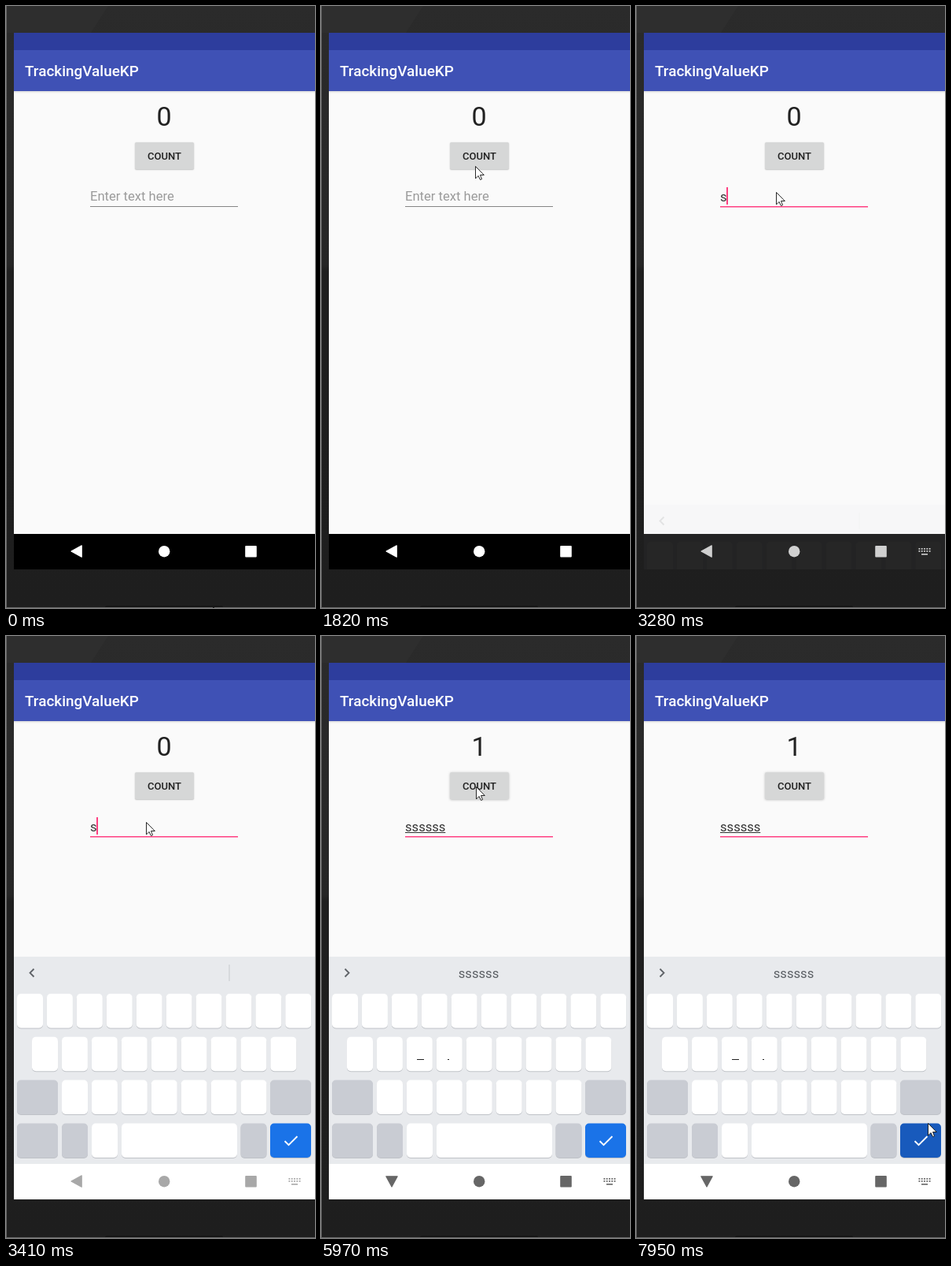
These frames come from a looping animation (393x764 px, 8 s). An HTML page with a canvas:

```html
<!DOCTYPE html>
<html lang="en">
<head>
<meta charset="utf-8">
<title>Counter demo</title>
<style>
html, body { margin: 0; width: 100%; height: 100%; overflow: hidden; background: #1e1e1e; }
canvas { display: block; }
</style>
</head>
<body>
<canvas id="stage" width="393" height="764"></canvas>
<script>
const screenCtx = document.getElementById('stage').getContext('2d');
const layer = Object.assign(document.createElement('canvas'), { width: 393, height: 764 });
const layerCtx = layer.getContext('2d');
let ctx = screenCtx;

const LOOP = 8000;
const TICK = 135;
const PINK = '#ff4081';
const GLYPH = 8.55;
const TIME = {
  focus: 2530, imeIcon: 2980, firstKey: 3280, keyboardUp: 3410, suggest: 3860,
  lastKey: 4340, press: 5520, count: 5660, release: 5970, done: 7800
};

// Each move bends towards (cx, cy) and ends at (x, y) after a number of ticks
const pointerStart = { x: 263, y: 762 };
const moves = [
  { start: 140, ticks: 4, cx: 353, cy: 620, x: 199, y: 359 },
  { start: 840, ticks: 5, cx: 176, cy: 270, x: 212, y: 186 },
  { start: 1820, ticks: 3, cx: 176, cy: 222, x: 178, y: 236 },
  { start: 4880, ticks: 3, cx: 186, cy: 212, x: 197, y: 191 },
  { start: 6560, ticks: 8, cx: 270, cy: 440, x: 371, y: 618 }
];

const clamp = v => Math.min(1, Math.max(0, v));
const smooth = p => p * p * (3 - 2 * p);
const bend = (a, b, c, p) => (1 - p) ** 2 * a + 2 * p * (1 - p) * b + p * p * c;

function pointerAt(t) {
  let pos = pointerStart;
  for (const m of moves) {
    if (t < m.start) break;
    const p = smooth(clamp((Math.floor((t - m.start) / TICK) + 1) / m.ticks));
    pos = { x: Math.round(bend(pos.x, m.cx, m.x, p)), y: Math.round(bend(pos.y, m.cy, m.y, p)) };
  }
  return pos;
}

const typed = t => Math.max(0, Math.min(6, 1 + Math.floor((t - TIME.firstKey) / 200)));
const composed = t => typed(t - 200);
const caretOn = t => t >= TIME.focus && Math.floor(Math.max(0, t - TIME.lastKey) / 500) % 2 === 0;
const navFade = t => t < TIME.firstKey ? 0 : clamp(0.31 + 0.26 * Math.floor((t - TIME.firstKey) / 130));

function rect(x, y, w, h, color) {
  ctx.fillStyle = color;
  ctx.fillRect(x, y, w, h);
}

function round(x, y, w, h, r, color) {
  ctx.fillStyle = color;
  ctx.beginPath();
  ctx.roundRect(x, y, w, h, r);
  ctx.fill();
}

function poly(points, fill, stroke, width = 1) {
  ctx.beginPath();
  points.forEach(([x, y]) => ctx.lineTo(x, y));
  if (fill) {
    ctx.closePath();
    ctx.fillStyle = fill;
    ctx.fill();
  }
  if (stroke) {
    ctx.strokeStyle = stroke;
    ctx.lineWidth = width;
    ctx.stroke();
  }
}

function text(str, x, y, size, color, align = 'left', weight = 400) {
  ctx.font = `${weight} ${size}px Roboto, sans-serif`;
  ctx.textAlign = align;
  ctx.fillStyle = color;
  ctx.fillText(str, x, y);
}

function drawBezel() {
  const shade = ctx.createLinearGradient(0, 0, 0, 764);
  shade.addColorStop(0, '#2b2b2b');
  shade.addColorStop(0.43, '#262626');
  shade.addColorStop(0.44, '#1f1f1f');
  shade.addColorStop(1, '#1e1e1e');
  rect(0, 0, 393, 764, shade);
  poly([[0, 0], [130, 0], [108, 34], [0, 34]], '#2e2e2e');
  round(126, 761, 150, 5, 2, '#151515');
  rect(0, 0, 1, 764, '#666');
  rect(0, 763, 393, 1, '#666');
}

function drawApp(t) {
  rect(10, 34, 383, 22, '#2d3d9d');
  rect(10, 108, 383, 562, '#fafafa');
  const shadow = ctx.createLinearGradient(0, 108, 0, 111);
  shadow.addColorStop(0, 'rgba(0,0,0,.12)');
  shadow.addColorStop(1, 'rgba(0,0,0,0)');
  rect(10, 108, 383, 3, shadow);
  rect(10, 56, 383, 52, '#3f51b5');
  text('TrackingValueKP', 24, 89, 18.9, '#fff', 'left', 500);

  text(t < TIME.count ? '0' : '1', 201, 151.5, 34, '#212121', 'center');

  const pressed = t >= TIME.press && t < TIME.release;
  ctx.save();
  ctx.shadowColor = 'rgba(0,0,0,.25)';
  ctx.shadowBlur = t < TIME.press ? 1.5 : 3;
  ctx.shadowOffsetY = 0.5;
  round(164, 173, 75, 34.5, 2, pressed ? '#c6c7c7' : '#d6d7d7');
  ctx.restore();
  text('COUNT', 201.5, 195, 13, '#212121', 'center', 500);
}

function drawField(t) {
  const count = typed(t);
  if (count) text('s'.repeat(count), 107, 247.5, 16.6, '#333');
  else text('Enter text here', 107, 247, 16.6, '#9b9b9b');
  rect(107, 249, composed(t) * GLYPH, 1, '#333');
  rect(107, 254, 188, 1, '#858585');
  if (t >= TIME.focus) rect(107, 254, 188, 1.5, PINK);
  if (caretOn(t)) rect(Math.floor(107 + count * GLYPH), 230, 2, 22, PINK);
}

function key(x, y, w = 33, color = '#fff') {
  round(x, y + 1, w, 43.5, 5, '#bfc2c7');
  round(x, y, w, 43.5, 5, color);
}

function keyRow(x, y, n) {
  for (let i = 0; i < n; i++) key(x + i * 37.92, y);
}

function drawKeyboard(t) {
  const gray = '#c9ccd3';
  rect(10, 407, 383, 263, '#e8eaed');
  rect(10, 670, 383, 45, '#fff');

  const suggesting = t >= TIME.suggest;
  const [tip, tail] = suggesting ? [35.5, 30.5] : [30.5, 35.5];
  poly([[tail, 422.5], [tip, 427.5], [tail, 432.5]], null, '#5f6368', 1.8);
  if (suggesting) text('s'.repeat(composed(t)), 200.5, 434, 16.6, '#5a5e63', 'center');
  else rect(283.5, 417, 1, 21, '#c6c9cd');

  keyRow(14, 454, 10);
  keyRow(33, 508.7, 9);
  keyRow(71, 563.5, 7);
  for (const y of [563.5, 618.5]) key(14, y, 52, gray);
  for (const x of [71, 298.5]) key(x, 618.5, 33, gray);
  key(336, 563.5, 52, gray);
  key(109, 618.5);
  key(147, 618.5, 147);
  key(336, 618.5, 52, t < TIME.done ? '#1a73e8' : '#185abc');
  poly([[354.5, 641], [359.5, 646], [370.5, 635]], null, '#fff', 1.9);

  // Remains of the pressed letters
  if (suggesting) {
    rect(122, 537, 9, 1, '#222');
    rect(161, 537, 2, 1, '#222');
  }
}

function drawKeyboardLayer(t) {
  const rising = t < TIME.keyboardUp;
  ctx = layerCtx;
  ctx.clearRect(0, 0, 393, 764);
  drawKeyboard(t);
  ctx = screenCtx;
  ctx.save();
  ctx.beginPath();
  ctx.rect(10, 108, 383, 607);
  ctx.clip();
  ctx.globalAlpha = rising ? 0.15 : 1;
  ctx.drawImage(layer, 0, rising ? 226 : 0);
  ctx.restore();
}

function drawNav(t) {
  const fade = navFade(t);
  const level = Math.round(255 - 153 * fade);
  const color = `rgb(${level},${level},${level})`;
  ctx.save();
  ctx.translate(90, 692);
  ctx.rotate(-Math.PI / 2 * clamp((fade - 0.57) / 0.43));
  ctx.lineJoin = 'round';
  poly([[-7, 0], [6.2, -7.2], [6.2, 7.2], [-7, 0]], color, color, 1.2);
  ctx.restore();

  round(194, 685, 14.4, 14.4, 7.2, color);
  round(304.2, 685, 14.6, 14.6, 1, color);

  if (t >= TIME.imeIcon) {
    for (let i = 0; i < 10; i++) {
      rect(359.5 + (i % 5) * 3.3, 688 + Math.floor(i / 5) * 3, 1.8, 1.8, color);
    }
    rect(363, 695, 8, 1.6, color);
  }
}

function drawPointer(t) {
  const { x, y } = pointerAt(t);
  ctx.save();
  ctx.translate(x + 0.5, y + 0.5);
  poly([[0, 0], [0, 15.5], [3.5, 12], [6, 17], [8, 16.2], [6, 11], [10.8, 11], [0, 0]], '#fff', '#111', 0.9);
  ctx.restore();
}

function draw(t) {
  drawBezel();
  drawApp(t);
  drawField(t);
  rect(10, 670, 383, 45, '#000');
  if (t >= TIME.firstKey) drawKeyboardLayer(t);
  drawNav(t);
  drawPointer(t);
}

const start = performance.now();
function frame() {
  draw((performance.now() - start) % LOOP);
  requestAnimationFrame(frame);
}
frame();
</script>
</body>
</html>
```
